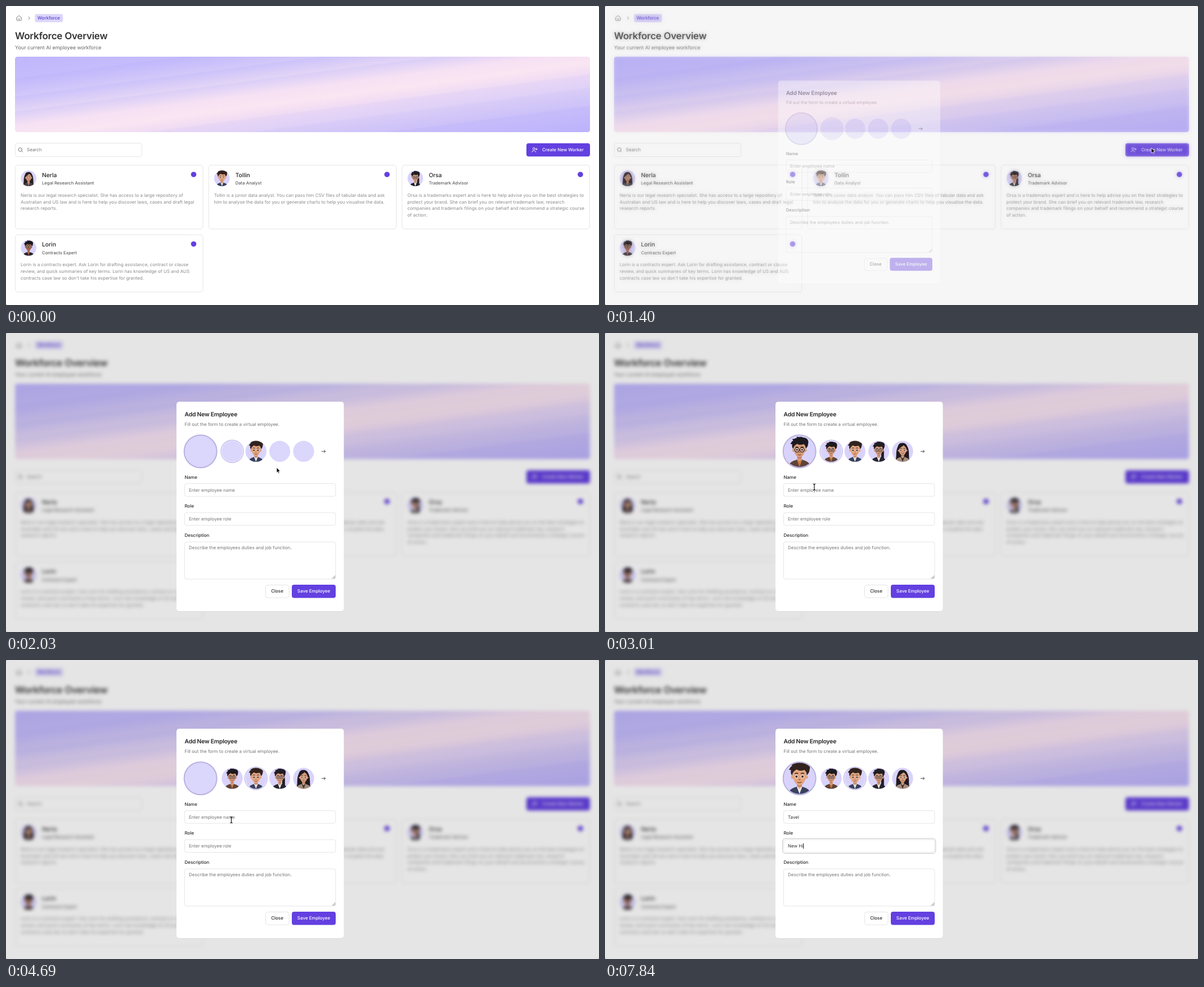
Recreate the animation shown at these times as an HTML page. Size 1054 px wide and 531 px high, loop 8 s.

```html
<!DOCTYPE html>
<html lang="en">
<head>
<meta charset="utf-8">
<title>Workforce overview</title>
<style>
  html, body { margin: 0; width: 100%; height: 100%; overflow: hidden; background: #777; }
  #stage { position: absolute; inset: 0; width: 1054px; height: 531px; overflow: hidden; border-radius: 2.5px; background: #fff; }
  #stage > svg, #veil { position: absolute; left: 0; top: 0; width: 1054px; height: 531px; }
  #veil { background: rgba(0, 0, 0, .1); backdrop-filter: blur(3px); }
  text { font: 400 8px Inter, sans-serif; fill: #757575; text-rendering: geometricPrecision; }
  .title { font-size: 17px; font-weight: 600; letter-spacing: -.015em; fill: #333; }
  .lead { font-size: 9px; fill: #666; }
  .name { font-size: 10.3px; font-weight: 500; fill: #222; }
  .role { font-size: 7.7px; font-weight: 500; fill: #5c5c5c; }
  .body { fill: #8b8b8b; }
  .head { font-size: 10.3px; font-weight: 600; letter-spacing: -.018em; fill: #222; }
  .label { font-weight: 500; fill: #2a2a2a; }
  .typed { fill: #333; }
  .mid { text-anchor: middle; }
  .cta { font-weight: 500; fill: #fff; }
  .chip { font-weight: 500; fill: #5a3fd0; }
  .box { fill: #fff; stroke: #e5e5e5; }
  .btn, .mark { fill: #6340e0; }
  .line { fill: none; stroke: #6b6b6b; stroke-width: .9; stroke-linecap: round; stroke-linejoin: round; }
  .ring { fill: none; stroke: #c6c6c6; }
  .disc { fill: #dbd6fc; }
  .halo { fill: none; stroke: #c3bcea; stroke-width: 1.4; }
</style>
</head>
<body>
<div id="stage">
  <svg id="page" viewBox="0 0 1054 531">
    <defs>
      <clipPath id="round"><circle r="20"/></clipPath>
      <linearGradient id="sky" gradientUnits="userSpaceOnUse" x1="509.9" y1="25.7" x2="544.1" y2="288.3">
        <stop offset="0" stop-color="#bfb6fd"/>
        <stop offset=".14" stop-color="#c5bcfc"/>
        <stop offset=".15" stop-color="#c1b8fc"/>
        <stop offset=".26" stop-color="#d2c8f9"/>
        <stop offset=".27" stop-color="#cdc3fa"/>
        <stop offset=".36" stop-color="#e2d4f6"/>
        <stop offset=".37" stop-color="#dbcff7"/>
        <stop offset=".46" stop-color="#f6e1f4"/>
        <stop offset=".54" stop-color="#fae5f2"/>
        <stop offset=".61" stop-color="#f0dcf4"/>
        <stop offset=".62" stop-color="#e8d6f5"/>
        <stop offset=".7" stop-color="#dfd1f7"/>
        <stop offset=".71" stop-color="#d9ccf7"/>
        <stop offset=".82" stop-color="#cdc2f9"/>
        <stop offset=".83" stop-color="#c7bcfa"/>
        <stop offset="1" stop-color="#bcb2fc"/>
      </linearGradient>
    </defs>
    <path class="line" d="M18.9 20.6 22.4 17.4Q23 16.9 23.6 17.4L27.3 20.6V24.4Q27.3 25.8 25.9 25.8H20.3Q18.9 25.8 18.9 24.4ZM21.3 22.9Q23 24.3 24.8 22.9"/>
    <path class="line" d="M40 19.2 42.3 21.5 40 23.8"/>
    <rect x="51.5" y="14.3" width="49.7" height="14.5" rx="3" fill="#dcd6fb"/>
    <text class="chip" x="56" y="24.4">Workforce</text>
    <text class="title" x="16" y="59.2">Workforce Overview</text>
    <text class="lead" x="16" y="76.6">Your current AI employee workforce</text>
    <rect x="16" y="90" width="1022" height="134" rx="4.5" fill="url(#sky)"/>
    <rect class="box" x="16.5" y="243.5" width="225" height="24" rx="4"/>
    <circle class="line" cx="25.3" cy="255" r="3.2"/>
    <path class="line" d="M27.7 257.4 29.6 259.3"/>
    <text x="37" y="258.4">Search</text>
    <g id="create">
      <rect class="btn" x="925" y="243.8" width="113" height="23.4" rx="4"/>
      <g class="line" style="stroke: #fff">
        <circle cx="938.2" cy="253.3" r="1.9"/>
        <path d="M934.8 259.4Q935 256.7 938.2 256.7T941.5 259.4M942.8 252.6V255.8M941.2 254.2H944.4"/>
      </g>
      <text class="cta" x="953" y="258.4" style="font-size: 7.9px">Create New Worker</text>
    </g>
    <g id="cards"></g>
  </svg>

  <div id="veil"></div>

  <svg id="top" viewBox="0 0 1054 531">
    <g id="dialog">
      <rect x="303" y="123" width="297.5" height="372" rx="6" fill="#000" opacity=".04"/>
      <rect x="303" y="122" width="297.5" height="372" rx="5" fill="#fff"/>
      <text class="head" x="317.5" y="148">Add New Employee</text>
      <text x="317.5" y="165">Fill out the form to create a virtual employee.</text>
      <g id="picker"></g>
      <path class="line" style="stroke: #333" d="M561.3 210.3H567.6M565.4 208.1 567.7 210.3 565.4 212.5"/>
      <g id="fields"></g>
      <text class="label" x="317.5" y="362">Description</text>
      <rect class="box" x="317.5" y="371" width="268.3" height="66" rx="3.5"/>
      <text x="325" y="384.4">Describe the employees duties and job function.</text>
      <path class="line" d="M580.3 436 585 431.3M583 436 585 434"/>
      <rect class="box" x="461.5" y="447.5" width="41.5" height="22.7" rx="4"/>
      <text class="label mid" x="482" y="461.4">Close</text>
      <rect class="btn" x="508" y="447" width="78" height="23.6" rx="4"/>
      <text class="cta mid" x="547" y="461.4">Save Employee</text>
    </g>
    <g id="cursor">
      <path id="arrow" fill="#000" stroke="#fff" stroke-width=".8" d="M0 0V9.2L2.1 7.3 3.5 10.4 5.1 9.7 3.7 6.7H6.6Z"/>
      <path id="beam" fill="none" stroke="#111" stroke-width="1.2" d="M-2-5.3Q0-5.3 0-4Q0-5.3 2-5.3M0-4.5V4.5M-2 5.3Q0 5.3 0 4Q0 5.3 2 5.3"/>
    </g>
  </svg>
</div>

<script>
const LOOP = 8000, TICK = 70;
const $ = id => document.getElementById(id);
const text = (cls, x, y, s) => `<text class="${cls}" x="${x}" y="${y}">${s}</text>`;
const show = (el, on) => { el.style.visibility = on ? 'inherit' : 'hidden'; };

// Portraits in a 40-unit circle.
const LOOKS = {
  spiky:  { hair: '#1d1a1f', skin: '#d99b78', coat: '#5d4438', shirt: '#c9733f', glasses: true },
  quiff:  { hair: '#32221e', skin: '#e3a57f', coat: '#39415f', shirt: '#efe9e6', size: 1.17 },
  suit:   { hair: '#211d22', skin: '#d49a7b', coat: '#25252f', shirt: '#f1eeee', glasses: true, tail: true },
  long:   { hair: '#1f1a1e', skin: '#d69c7c', coat: '#a58d7c', shirt: '#3a3032', mane: true },
  bob:    { hair: '#231e22', skin: '#cf9678', coat: '#40404a', shirt: '#b06a62', mane: true },
  formal: { hair: '#1b181b', skin: '#a86f53', coat: '#26242b', shirt: '#a2543f', glasses: true }
};
const TUFTS = 'M-8-3C-9.5-5-10-7-9.2-9L-11.8-9.6C-10-11-10.4-13-8-13.6L-9.4-16C-6.5-15-5.6-17.6-3.4-17L-3.6-19C0-17.6 2-19.6 5-17.6C9-18 12.8-13.6 11-9.6C11.2-7 9.6-5 8-3.4C8-6 7-8 5.4-9.4C3-8-1-8-3-9.8C-5-8.4-7.4-7.6-8-3Z';
const SLEEK = 'M-8-2C-11-9-8-16-1-16C7-17 11-9 8-2C8-6 5-9 2-11.5C-1-9-6-7-8-2Z';

function portrait(id, { hair, skin, coat, shirt, glasses, tail, mane, size = 1 }) {
  const eyes = [-3.3, 3.3].map(x => `
    <ellipse cx="${x}" cy="-2" rx="1.7" ry="1.9" fill="#fff"/>
    <circle cx="${x}" cy="-1.9" r="1.25" fill="#3a2219"/>
    <path d="M${x - 1.9}-5.1Q${x}-6.2 ${x + 1.9}-5.1" fill="none" stroke="${hair}" stroke-width=".9"/>
    ${glasses ? `<circle cx="${x}" cy="-1.9" r="2.8" fill="none" stroke="#221c20" stroke-width=".8"/>` : ''}`).join('');
  return `<symbol id="${id}" viewBox="-20 -20 40 40"><g clip-path="url(#round)">
    <circle r="20" fill="#d9d3fc"/>
    ${mane ? `<path fill="${hair}" d="M-8-11C-15 0-10 10-14 17H13C11 9 14-3 8-11Z"/>` : ''}
    ${tail ? `<path fill="${hair}" d="M6-8C13-2 8 8 11 18L5 17C4 9 5 3 5-4Z"/>` : ''}
    <path fill="${coat}" d="M-14 21C-14 13-7 12-3 10.5H3C7 12 14 13 14 21Z"/>
    <path fill="${shirt}" d="M-3.6 10.5 0 20 3.6 10.5Z"/>
    <path fill="${skin}" d="M-2.8 5H2.8V10.5L0 13.5-2.8 10.5Z"/>
    <g transform="scale(${size})">
      <path fill="#7a4632" opacity=".35" d="M-3 6.4H3L2.6 8.6Q0 10-2.6 8.6Z"/>
      <circle cx="-7.4" cy="-1.4" r="1.9" fill="${skin}"/><circle cx="7.4" cy="-1.4" r="1.9" fill="${skin}"/>
      <path fill="${skin}" d="M-7.4-5C-7.5-14 7.5-14 7.4-5C7.6 2 4 7.6 0 7.8C-4 7.6-7.6 2-7.4-5Z"/>
      ${eyes}
      <path d="M-.7 1.1Q0 1.8 .8 1.1M-2.3 3.9Q0 5.7 2.3 3.9" fill="none" stroke="#8a4435" stroke-width=".8"/>
      <path fill="${hair}" d="${mane ? SLEEK : TUFTS}"/>
    </g></g></symbol>`;
}

const use = (id, cx, cy, r) =>
  `<use href="#${id}" x="${cx - r}" y="${cy - r}" width="${2 * r}" height="${2 * r}"/>`;

const WORKERS = [
  { x: 16.5, y: 282.5, h: 113.5, look: 'bob', name: 'Nerla', role: 'Legal Research Assistant', lines: [
    'Nerla is our legal research specialist. She has access to a large repository of',
    'Australian and US law and is here to help you discover laws, cases and draft legal',
    'research reports.'] },
  { x: 360.2, y: 282.5, h: 113.5, look: 'quiff', name: 'Tollin', role: 'Data Analyst', lines: [
    'Tollin is a junior data analyst. You can pass him CSV files of tabular data and ask',
    'him to analyse the data for you or generate charts to help you visualise the data.'] },
  { x: 703.9, y: 282.5, h: 113.5, look: 'suit', name: 'Orsa', role: 'Trademark Advisor', lines: [
    'Orsa is a trademarks expert and is here to help advise you on the best strategies to',
    'protect your brand. She can brief you on relevant trademark law, research',
    'companies and trademark filings on your behalf and recommend a strategic course',
    'of action.'] },
  { x: 16.5, y: 406, h: 102, look: 'formal', name: 'Lorin', role: 'Contracts Expert', lines: [
    'Lorin is a contracts expert. Ask Lorin for drafting assistance, contract or clause',
    'review, and quick summaries of key terms. Lorin has knowledge of US and AUS',
    'contracts case law so don’t take his expertise for granted.'] }
];

const card = w => `<g transform="translate(${w.x} ${w.y})">
  <rect class="box" width="333.6" height="${w.h}" rx="5"/>
  ${use(w.look, 23.6, 23.6, 14)}
  ${text('name', 47.5, 21.4, w.name)}${text('role', 47.5, 34.6, w.role)}
  <circle class="mark" cx="317" cy="16.7" r="4.8"/>
  ${w.lines.map((s, i) => text('body', 9.6, 56.3 + i * 11.7, s)).join('')}</g>`;

$('page').querySelector('defs').insertAdjacentHTML('beforeend',
  Object.entries(LOOKS).map(([id, look]) => portrait(id, look)).join(''));
$('cards').innerHTML = WORKERS.map(card).join('');

// Avatar choices: position, look and load time.
const ROW_Y = 210.2;
const CHOICES = [
  { x: 402, look: 'spiky', at: 2450 }, { x: 444.3, look: 'quiff', at: 2030 },
  { x: 486.6, look: 'suit', at: 2310 }, { x: 529, look: 'long', at: 2170 }
];
const PICKED = 4060;
$('picker').innerHTML = `
  <circle class="disc" cx="345.7" cy="${ROW_Y}" r="29" stroke="#b9b1de" stroke-width="2"/>
  <g id="bigA">${use('spiky', 345.7, ROW_Y, 27.7)}</g><g id="bigB">${use('quiff', 345.7, ROW_Y, 27.7)}</g>` +
  CHOICES.map((c, i) => `<circle class="disc" cx="${c.x}" cy="${ROW_Y}" r="18.6"/>
    <g id="pick${i}">${use(c.look, c.x, ROW_Y, 18.6)}</g>
    ${i < 2 ? `<circle id="halo${i}" class="halo" cx="${c.x}" cy="${ROW_Y}" r="20"/>` : ''}`).join('');

// Form fields: each typed stage is [time, letters so far].
const FIELDS = [
  { label: 'Name', y: 267.5, hint: 'Enter employee name', word: 'Tavel', focus: 5390, blur: 6720,
    typing: [[5950, 1], [6160, 2], [6230, 3], [6440, 4], [6510, 5]] },
  { label: 'Role', y: 319, hint: 'Enter employee role', word: 'New\u00a0Hi', focus: 6720, blur: LOOP,
    typing: [[7070, 1], [7280, 3], [7420, 4], [7630, 5], [7840, 6]] }
];
$('fields').innerHTML = FIELDS.map(({ label, y, hint }, i) => `
  ${text('label', 317.5, y - 9, label)}
  <rect class="box" x="317.5" y="${y}" width="268.3" height="22.6" rx="3.5"/>
  <rect id="ring${i}" class="ring" x="315.5" y="${y - 2}" width="272.3" height="26.6" rx="5"/>
  <g id="hint${i}">${text('', 325, y + 14.4, hint)}</g>
  <text id="typed${i}" class="typed" x="325" y="${y + 14.4}"></text>
  <rect id="caret${i}" y="${y + 6.4}" width="1" height="10" fill="#222"/>`).join('');

// Pointer waypoints: time, x, y.
const PATH = [
  [0, 590, 545], [560, 722, 400], [770, 722, 400], [1190, 971, 252], [1540, 971, 252],
  [1820, 484, 240], [1960, 484, 240], [2030, 481, 239], [2800, 405, 262], [3010, 372, 273.5],
  [3290, 374, 279], [3430, 374, 279], [3990, 444, 216], [4340, 444, 216],
  [4690, 400.5, 284], [5250, 401, 283], [LOOP, 401, 283]
];
const POINTER_GONE = 5530;

function pointerAt(t) {
  const i = PATH.findIndex(p => p[0] > t);
  const [t0, x0, y0] = PATH[i - 1], [t1, x1, y1] = PATH[i];
  const u = (t - t0) / (t1 - t0), k = u * u * (3 - 2 * u);
  return [x0 + (x1 - x0) * k, y0 + (y1 - y0) * k];
}

function drawPointer(t) {
  const [x, y] = pointerAt(t);
  const overField = t > 2000 && y > 267 && y < 291;
  $('cursor').setAttribute('transform', `translate(${x} ${y})`);
  show($('cursor'), t > 0 && t < POINTER_GONE);
  show($('arrow'), !overField);
  show($('beam'), overField);
  $('create').setAttribute('opacity', x > 925 && y < 267 ? .9 : 1);
}

function drawDialog(t) {
  const u = Math.min(1, Math.max(0, (t - 1358) / 200));
  const p = 1 - (1 - u) ** 2, scale = .95 + .05 * p;
  $('veil').style.opacity = p;
  show($('veil'), p > 0);
  show($('dialog'), p > 0);
  $('dialog').setAttribute('opacity', p);
  $('dialog').setAttribute('transform',
    `translate(451.75 ${308 + 7.5 * (1 - p)}) scale(${scale}) translate(-451.75 -308)`);
}

function drawPicker(t) {
  show($('bigA'), t >= 2590 && t < 4410);
  show($('bigB'), t >= 4970);
  CHOICES.forEach((c, i) => show($('pick' + i), t >= c.at));
  show($('halo0'), t < PICKED);
  show($('halo1'), t >= PICKED);
}

function drawField(f, i, t) {
  const count = f.typing.reduce((n, [at, len]) => t >= at ? len : n, 0);
  const typed = $('typed' + i), focused = t >= f.focus && t < f.blur;
  typed.textContent = f.word.slice(0, count);
  show($('hint' + i), !count);
  show($('ring' + i), focused);
  show($('caret' + i), focused);
  $('caret' + i).setAttribute('x', 325 + (count ? typed.getComputedTextLength() : 0));
}

// The picture holds still within each tick.
function frame() {
  const t = Math.floor(performance.now() % LOOP / TICK) * TICK;
  drawDialog(t);
  drawPicker(t);
  FIELDS.forEach((f, i) => drawField(f, i, t));
  drawPointer(t);
  requestAnimationFrame(frame);
}
frame();
</script>
</body>
</html>
```
